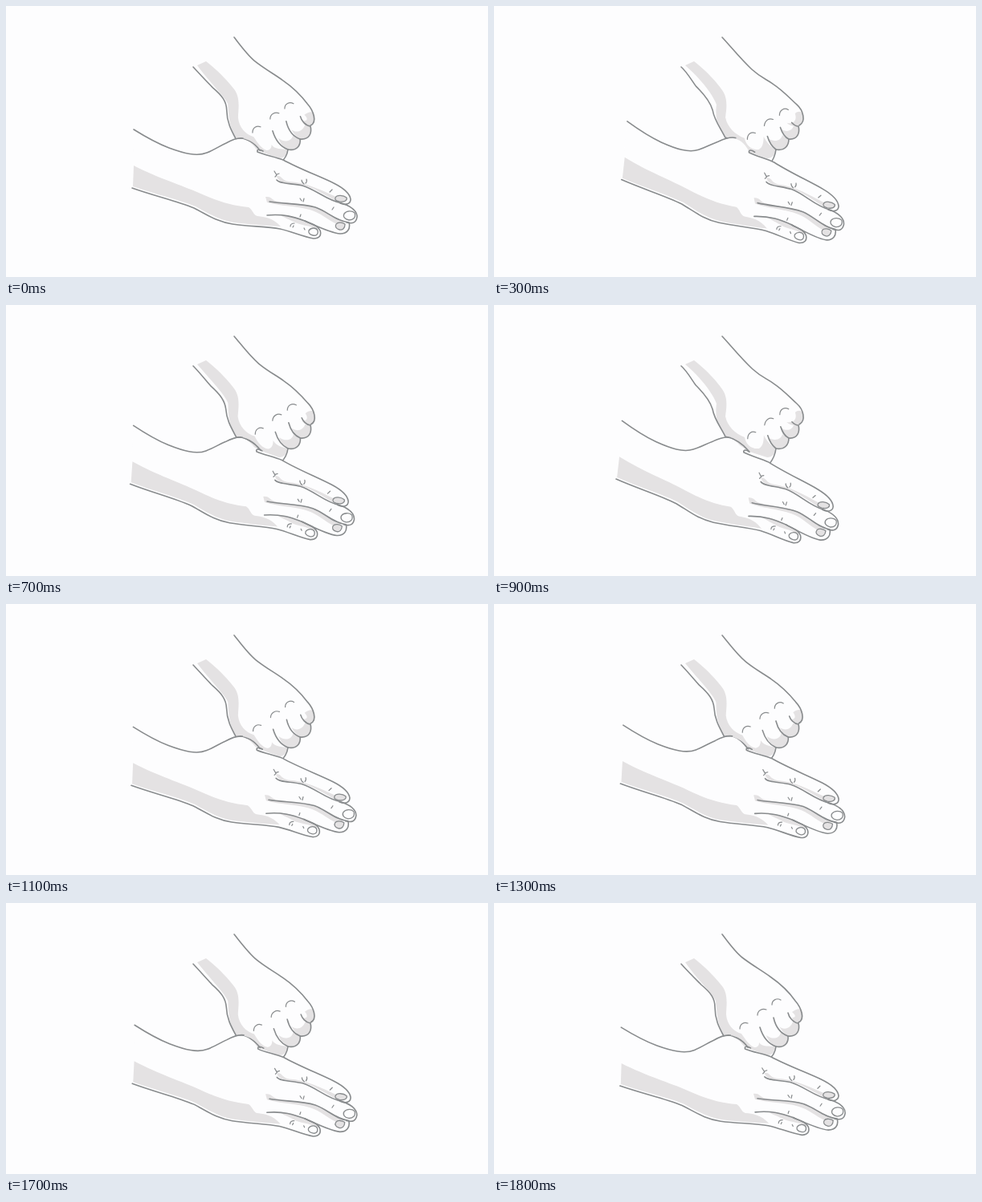
An HTML page for the animation above (2000 ms loop, 600x338 px).

```html
<!DOCTYPE html>
<html lang="en">
<head>
<meta charset="utf-8">
<title>Hand rubbing</title>
<style>
  html, body { margin: 0; width: 100%; height: 100%; overflow: hidden; background: #fdfdfe; }
  svg { display: block; width: 600px; height: 338px; }
  path { fill: none; stroke: #888b8d; stroke-width: 1.6; stroke-linecap: round; stroke-linejoin: round; }
  .shade path { fill: #e4e2e3; stroke: none; }
  .thin path { stroke-width: 1.2; }
  path.skin { fill: #fdfdfe; stroke: none; }
  path.nail { fill: #fdfdfe; stroke-width: 1.3; }
  path.dim { fill: #e4e2e3; }
</style>
</head>
<body>
<svg viewBox="0 0 600 338">
  <!-- Fist: d is the back pose, data-to the forward pose -->
  <g class="shade">
    <path d="M238 74 L249 69 C262 79 276 93 285 105 C292 116 289 130 289 139 C290 152 298 160 308 163 C313 170 318 178 324 180 C328 180 330 178 330 174 C334 180 343 178 351 179 C350 186 346 190 340 190 L316 181 L286 166 C277 148 278 138 276 122 C272 113 255 98 238 74Z"
      data-to="M238 74 L249 69 C262 79 276 93 284 105 C292 116 289 130 288 139 C291 152 300 160 312 165 C314 174 320 180 330 179 C335 176 336 170 336 162 C340 170 345 176 351 179 C350 186 346 190 340 190 L318 183 L288 163 C277 148 275 138 277 123 C272 109 255 88 238 74Z"/>
    <path d="M371 136 C376 132 381 131 383 134 C386 140 385 147 379 149 C373 148 372 146 371 143 C376 143 376 140 371 136Z"
      data-to="M375 134 C378 131 382 131 384 134 C387 140 385 147 380 149 C375 151 368 150 364 146 C372 148 378 143 375 134Z"/>
    <path d="M379 150 C381 158 378 167 366 166 C361 163 358 159 355 154 C362 160 370 155 372 148Z"
      data-to="M379 150 C381 158 378 167 367 166 C363 164 359 160 357 153 C364 158 371 156 373 150Z"/>
    <path d="M366 166 C367 174 362 181 351 179 C345 176 341 171 339 165 C348 172 357 168 357 160Z"
      data-to="M367 166 C367 174 362 181 351 179 C347 176 343 172 341 165 C350 171 358 167 359 161Z"/>
  </g>
  <path d="M233 76 C241 85 251 95 258 102 C270 112 275 119 275 130 C275 145 280 155 286 166 C298 164 309 170 316 180"
    data-to="M233 76 C240 82 246 93 251 100 C262 111 269 120 272 130 C274 142 282 152 288 164 C302 167 310 174 317 182"/>
  <path d="M284 39 C290 47 300 61 309 68 C322 78 333 84 344 92 C357 101 368 112 375 122 C382 130 388 145 379 149"
    data-to="M284 39 C297 53 308 67 322 80 C334 91 340 92 348 98 C360 106 368 115 377 123 C385 130 389 144 380 149"/>
  <path d="M366 137 C367 142 372 149 379 150 C381 158 378 167 366 166"
    data-to="M371 146 C373 148 376 150 379 150 C381 158 378 167 367 166"/>
  <path d="M348 143 C350 152 355 162 366 166 C367 174 362 181 351 179"
    data-to="M357 152 C359 158 361 163 367 166 C367 174 362 181 351 179"/>
  <path d="M331 155 C334 165 340 175 351 179 C350 187 347 191 341 196"
    data-to="M341 163 C343 170 346 175 351 179 C350 187 347 193 343 198"/>
  <g class="thin">
    <path d="M306 157 C306 151 311 148 316 150" data-to="M316 167 C316 160 321 157 326 159"/>
    <path d="M328 140 C328 134 334 131 339 133" data-to="M337 150 C338 143 343 140 348 142"/>
    <path d="M346 127 C346 121 352 118 357 121" data-to="M356 137 C356 130 362 127 367 130"/>
  </g>

  <g id="hand">
    <path class="skin" d="M159 154 C175 164 190 172 203 177 C222 184 238 188 250 183 C260 179 265 175 274 171 C283 166 289 165 295 166 C303 168 309 174 313 181 L345 192 C365 204 392 213 408 221 C420 226 428 234 429 241 L422 247 C432 251 438 255 438 263 C437 270 432 271 427 270 C429 278 425 284 416 284 L390 279 C393 284 391 290 383 290 C370 288 355 281 341 278 C325 275 303 275 282 272 C262 269 250 260 234 252 C212 243 185 237 157 227Z"/>
    <g class="shade">
      <path d="M159 199 C190 215 220 224 240 233 C262 243 280 249 302 251 C307 254 308 261 313 262 C322 263 332 264 342 275 C322 274 300 272 284 270 C268 268 252 259 236 250 C214 241 186 235 158 225Z"/>
      <path d="M337 212 C344 211 342 217 352 219 C374 220 393 230 411 238 L413 244 C397 236 382 226 369 223 C355 221 338 221 337 212Z"/>
      <path d="M323 238 C332 237 330 243 340 244 C358 247 372 246 385 251 C400 256 410 266 422 269 L412 272 C399 266 392 258 378 254 C361 249 342 250 325 245Z"/>
      <path d="M340 260 C355 261 363 264 372 268 L391 276 L388 279 C378 273 366 274 358 269 C350 265 346 264 340 260Z"/>
    </g>
    <path d="M159 154 C175 164 190 172 203 177 C222 184 238 188 250 183 C260 179 265 175 274 171 C283 166 289 164 295 165"/>
    <path d="M320 181 C315 178 312 179 313 182 C322 186 335 188 345 192 C365 203 392 213 408 221 C420 227 428 234 429 241 C429 247 423 249 416 246"/>
    <path d="M337 217 C341 222 355 221 369 224 C386 229 400 243 418 246 C430 250 437 255 437 263 C436 270 432 272 424 270"/>
    <path d="M328 244 C345 247 368 246 385 251 C400 256 410 268 427 270 C429 278 425 284 416 284 C404 283 388 275 372 268"/>
    <path d="M325 261 C345 259 358 263 372 268 C380 272 388 273 391 280 C393 286 390 290 383 290 C370 288 355 281 341 278 C325 275 303 275 282 272 C262 269 250 260 234 252 C212 243 185 237 157 227"/>
    <path class="nail dim" d="M410 239 C412 235 420 236 424 239 C425 242 422 245 415 244 C411 243 409 242 410 239Z"/>
    <path class="nail" d="M421 259 C424 255 431 255 434 258 C436 264 432 267 427 267 C422 266 419 263 421 259Z"/>
    <path class="nail dim" d="M411 272 C413 269 419 270 422 272 C422 277 419 280 415 279 C411 278 409 275 411 272Z"/>
    <path class="nail" d="M377 280 C380 276 386 276 388 280 C389 285 386 287 382 286 C378 285 376 283 377 280Z"/>
    <g class="thin">
      <path d="M334 206 L337 211 L335 213 M337 210 L340 209"/>
      <path d="M368 217 Q368 220 371 222 M374 216 Q375 219 373 221 M403 232 L406 229"/>
      <path d="M366 240 L368 243 M371 240 L370 244 M406 254 L408 251"/>
      <path d="M367 260 L366 263 M359 271 Q354 271 354 275 M358 274 L357 276 M371 277 L372 279"/>
    </g>
  </g>
</svg>
<script>
const hand = document.getElementById('hand');
const NUMBER = /\d+/g;
const morphs = [...document.querySelectorAll('[data-to]')].map(path => ({
  path,
  from: path.getAttribute('d'),
  to: path.dataset.to.match(NUMBER).map(Number)
}));

const LOOP = 2000, STEP = 100, LAST = 1800, STROKE = 620;

function pose(time) {
  const phase = (time - LAST) / STROKE;
  const push = (1 - Math.cos(2 * Math.PI * phase)) / 2;
  // The middle stroke also pulls the lower hand back.
  const middle = Math.floor(phase) === -2 ? push : 0;
  hand.setAttribute('transform',
    `translate(${-7 * middle} ${middle}) rotate(${4.8 * (push - 0.09)} 305 246)`);
  for (const { path, from, to } of morphs) {
    let i = 0;
    path.setAttribute('d', from.replace(NUMBER, n => +n + (to[i++] - n) * push));
  }
}

function draw() {
  const time = performance.now() % LOOP;
  pose(Math.min(LAST, Math.floor(time / STEP) * STEP));
  requestAnimationFrame(draw);
}
draw();
</script>
</body>
</html>
```
